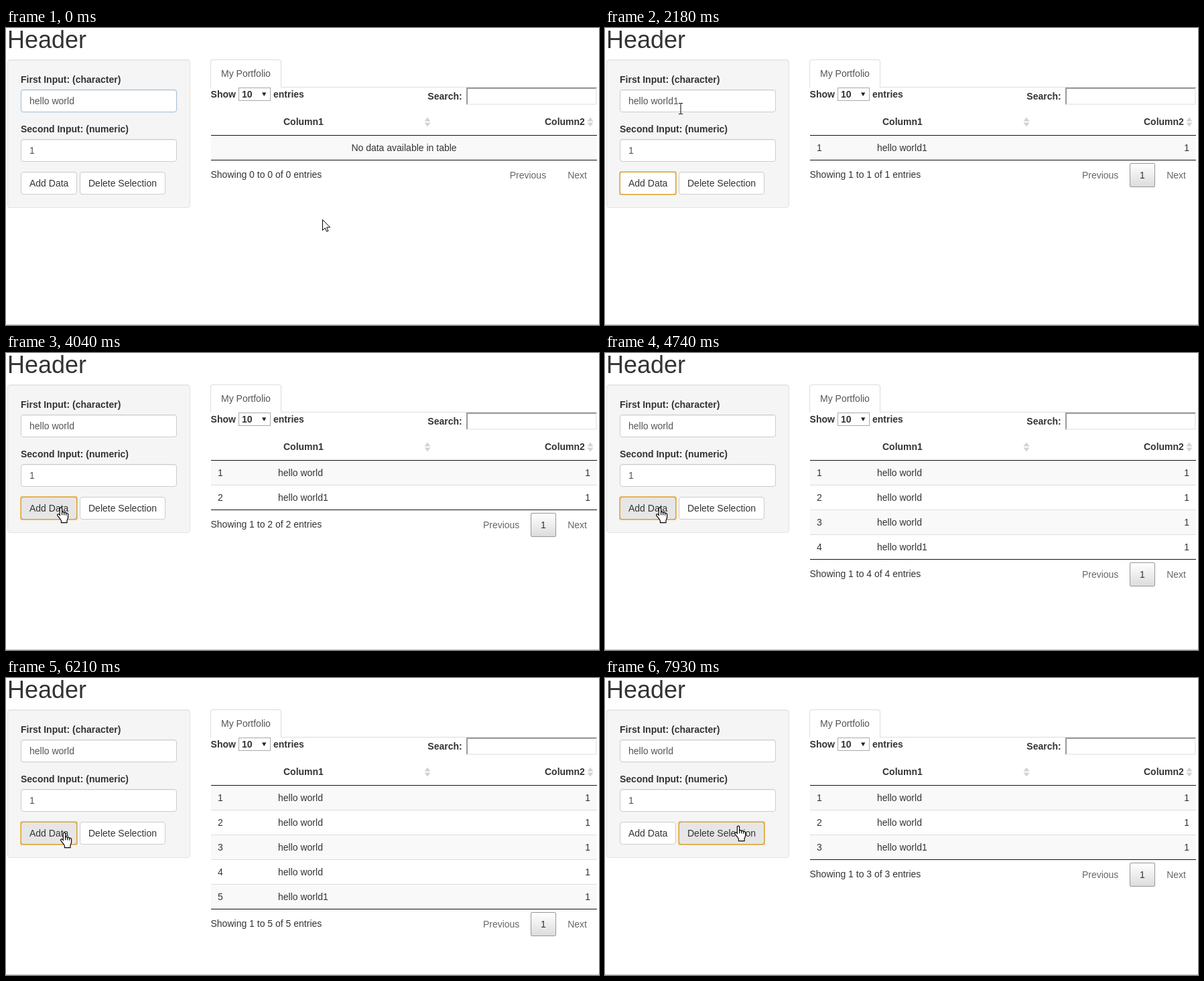
Recreate the animation shown at these times as an HTML page. Size 885 by 444 pixels, loop 8 s.

```html
<!DOCTYPE html>
<html lang="en">
<head>
<meta charset="utf-8">
<title>Table demo</title>
<style>
html, body { margin: 0; width: 100%; height: 100%; overflow: hidden; background: #fff; }
#stage { position: relative; width: 885px; height: 444px; overflow: hidden;
  font: 14px/20px "Liberation Sans", Arial, sans-serif; color: #333; }
#stage div { position: absolute; box-sizing: border-box; white-space: nowrap; }
svg { position: absolute; left: 0; top: 0; width: 885px; height: 444px; }
.b { font-weight: bold; }
.mute { color: #666; }
.title { font-size: 36px; line-height: 40px; }
.well { background: #f5f5f5; border: 1px solid #e3e3e3; border-radius: 4px;
  box-shadow: inset 0 1px 1px rgba(0,0,0,.05); }
.input { background: #fff; border: 1px solid #ccc; border-radius: 4px; padding: 6px 12px; color: #555;
  box-shadow: inset 0 1px 1px rgba(0,0,0,.075); }
.glow { border: 1px solid #66afe9; border-radius: 4px; box-shadow: 0 0 3px rgba(102,175,233,.6); }
.btn { background: #fff; border: 1px solid #ccc; border-radius: 4px; padding: 6px 12px; }
.btn.hover { background: #e6e6e6; border-color: #adadad; }
.btn.active { background: #d4d4d4; border-color: #8c8c8c; box-shadow: inset 0 3px 5px rgba(0,0,0,.125); }
.ring { border: 1px solid #d9a441; border-radius: 2px; box-shadow: 0 0 0 1px rgba(229,160,30,.6); }
.tab { background: #fff; border: 1px solid #ddd; border-bottom: 0; border-radius: 4px 4px 0 0;
  padding: 10px 15px; color: #555; }
.select { border: 1px solid #a9a9a9; }
.search { border: 2px solid; border-color: #9a9a9a #eee #eee #9a9a9a; }
.line { background: #ddd; }
.dark { background: #111; }
.edge { background: #c6c6c6; }
.odd { background: #f9f9f9; }
.row.sel { background: #b0bed9; }
.right { text-align: right; }
.empty { padding-top: 8px; text-align: center; }
.page { border: 1px solid #979797; border-radius: 2px; padding-top: 7px; text-align: center;
  background: linear-gradient(#fff, #dcdcdc); }
.caret { background: #333; }
</style>
</head>
<body>
<div id="stage"></div>
<script>
const LOOP = 8000, HOLD = 140, REPLY = 220, FADE = 150, ROW = 37, TOP = 161;
const stage = document.getElementById('stage');

function box(x, y, w, h, cls = '', text = '', parent = stage) {
  const el = document.createElement('div');
  el.className = cls;
  el.textContent = text;
  el.style.cssText = `left:${x}px;top:${y}px;` + (w ? `width:${w}px;height:${h}px` : '');
  parent.append(el);
  return el;
}
const label = (x, y, text, cls, parent) => box(x, y, 0, 0, cls, text, parent);
const show = (el, on) => { el.style.visibility = on ? 'inherit' : 'hidden'; };
const clamp = (v, lo = 0, hi = 1) => Math.min(hi, Math.max(lo, v));

// Side panel
label(2, -2, 'Header', 'title');
box(2, 47, 273, 222, 'well');
label(22, 67, 'First Input: (character)', 'b');
const field = box(22, 92, 233, 34, 'input');
const glow = box(22, 92, 233, 34, 'glow');
const caret = box(102, 101, 1, 16, 'caret');
label(22, 141, 'Second Input: (numeric)', 'b');
box(22, 166, 233, 34, 'input', '1');
const button = (id, x, w, text) =>
  ({ id, x, w, el: box(x, 215, w, 34, 'btn', text), ring: box(x, 215, w, 34, 'ring') });
const buttons = [button('add', 22, 84, 'Add Data'), button('del', 110, 128, 'Delete Selection')];

// Tab and table controls
box(305, 88, 577, 1, 'line');
box(305, 47, 106, 42, 'tab', 'My Portfolio');
label(305.6, 89, 'Show', 'b');
box(347, 89, 48, 20, 'select');
label(352, 89, '10', 'b');
label(399, 89, 'entries', 'b');
label(629.3, 92, 'Search:', 'b');
box(687, 89, 195, 26, 'search');
label(414, 130, 'Column1', 'b');
label(804, 130, 'Column2', 'b');
box(306, TOP - 1, 576, 1, 'dark');

// Rows
const rows = Array.from({ length: 5 }, (_, i) => {
  const el = box(306, TOP + ROW * i, 576, ROW - 1, 'row' + (i % 2 ? '' : ' odd'));
  if (i) box(0, -1, 576, 1, 'line', '', el);
  label(10, 8, i + 1, '', el);
  box(466, 8, 100, 20, 'right', '1', el);
  return { el, name: label(100, 8, '', '', el) };
});
const empty = box(306, TOP, 576, ROW - 1, 'empty odd', 'No data available in table');

// Everything below the last row moves together
const foot = box(0, 0, 885, 1);
box(306, TOP + ROW - 1, 576, 1, 'dark', '', foot);
const info = label(305.5, 209, '', '', foot);
const prev = label(0, 210, 'Previous', 'mute', foot);
const page = box(783, 202, 38, 36, 'page', '1', foot);
label(838.2, 210, 'Next', 'mute', foot);
box(0, 443, 885, 1, 'edge');

const sorter = x => `<path fill="#d3d3d3" d="M${x - 4.5} 139.5h9l-4.5-6zM${x - 4.5} 141.5h9l-4.5 6z"/>`;
stage.insertAdjacentHTML('beforeend', `<svg>
  <path fill="#222" d="M382 96.5h6.4l-3.2 5.5z"/>${sorter(629)}${sorter(872)}
  <g id="cursor">
    <circle id="spot" r="15.5" fill="#f0e600" fill-opacity=".6"/>
    <path id="arrow" fill="#fff" stroke="#000" d="M.5.5v16l3.7-3.6 2.3 5.4 2.4-1-2.3-5.3h5z"/>
    <g id="hand" transform="translate(-6.5 -1.5) scale(1.07)" fill="#fff" stroke="#000" stroke-width="1.1">
      <path d="M6 1.5c1 0 1.6.7 1.6 1.6V8c.3-.6 2.6-.6 2.9.6.6-.7 2.5-.4 2.8.8.8-.6 2.7-.2 2.7 1.4v4.2c0 2-1.5 3-1.5 5v2.5H6.5V20C6 18 2 14 1.2 12.5c-.7-1.4 1.2-2.6 2.4-1.4l.9 1V3.1c0-.9.6-1.6 1.5-1.6z"/>
      <path fill="none" d="M7.6 8v4M10.5 8.6v3.6M13.3 9.4v3"/>
    </g>
    <path id="beam" fill="none" stroke="#000" d="M-3-7.5h2.5l.5.5.5-.5H3M0-7V8M-3 8.5h2.5l.5-.5.5.5H3"/>
  </g></svg>`);
const [cursor, spot, arrow, hand, beam] = ['cursor', 'spot', 'arrow', 'hand', 'beam']
  .map(id => document.getElementById(id));

// What the user does: arrive somewhere, click something, type and erase one digit
const PLACES = { start: [472, 286], panel: [190, 150], text: [116, 109], edge: [79, 222], add: [82, 231],
  row2: [345, 215], row3: [338, 240], del: [199, 221] };
const ARRIVE = { 140: 'panel', 470: 'text', 1420: 'edge', 1740: 'add', 2230: 'text', 2810: 'add',
  6450: 'row2', 6800: 'row3', 7450: 'del' };
const CLICKS = { 540: 'text', 1560: 'add', 2280: 'text', 3110: 'add', 3900: 'add', 4510: 'add', 5290: 'add',
  6550: 'row', 6830: 'row', 7650: 'del' };
const TYPED = 1000, ERASED = 2500;

// Each move eases into its place and ends at the arrival time
function locate(t) {
  let [x, y] = PLACES.start;
  for (const [end, place] of Object.entries(ARRIVE)) {
    const k = clamp(1 - (end - t) / Math.min(260, end / 2)), e = k * k * (3 - 2 * k);
    const [px, py] = PLACES[place];
    x += (px - x) * e;
    y += (py - y) * e;
  }
  return [Math.round(x), Math.round(y)];
}

// Replays all clicks up to time t
function replay(t) {
  const s = { focus: '', count: 0, picked: 0, pressed: false, level: 0.35, blink: 0 };
  let last = 0;
  const fade = now => {
    const step = (now - last) / FADE;
    s.level += clamp((s.focus === 'text' ? 1 : 0) - s.level, -step, step);
    last = now;
  };
  for (const [time, kind] of Object.entries(CLICKS)) {
    const age = t - time;
    if (age < 0) break;
    fade(+time);
    s.focus = kind;
    s.pressed = age < HOLD;
    if (kind === 'text') s.blink = +time;
    if (kind === 'row' && age >= HOLD) s.picked++;
    if (kind === 'add' && age >= REPLY) s.count++;
    if (kind === 'del' && age >= REPLY) {
      s.count -= s.picked;
      s.picked = 0;
    }
  }
  fade(t);
  for (const key of [TYPED, ERASED]) if (t >= key) s.blink = Math.max(s.blink, key);
  return s;
}

function render(t) {
  const { focus, count, picked, pressed, level, blink } = replay(t);
  const [x, y] = locate(t);
  const inside = (left, top, w) => x >= left && x < left + w && y >= top && y < top + 34;
  const digit = t >= TYPED && t < ERASED;

  field.textContent = 'hello world' + (digit ? '1' : '');
  glow.style.opacity = level;
  caret.style.left = (digit ? 110 : 102) + 'px';
  show(caret, focus === 'text' && (t - blink) % 1000 < 500);

  let over = false;
  for (const b of buttons) {
    const hover = inside(b.x, 215, b.w);
    over = over || hover;
    b.el.className = 'btn' + (hover ? pressed ? ' active' : ' hover' : '');
    show(b.ring, focus === b.id);
  }

  rows.forEach((r, i) => {
    show(r.el, i < count);
    r.el.classList.toggle('sel', i > 0 && i <= picked);
    r.name.textContent = 'hello world' + (i === count - 1 ? '1' : '');
  });
  show(empty, !count);
  show(page, count);
  foot.style.top = ROW * Math.max(0, count - 1) + 'px';
  prev.style.left = (count ? 711.9 : 751.7) + 'px';
  info.textContent = `Showing ${Math.min(1, count)} to ${count} of ${count} entries`;

  const typing = inside(22, 92, 233) || inside(22, 166, 233);
  cursor.setAttribute('transform', `translate(${x} ${y})`);
  show(spot, pressed);
  show(hand, over);
  show(beam, typing);
  show(arrow, !over && !typing);
}

const start = performance.now();
function tick() {
  render((performance.now() - start) % LOOP);
  requestAnimationFrame(tick);
}
tick();
</script>
</body>
</html>
```
